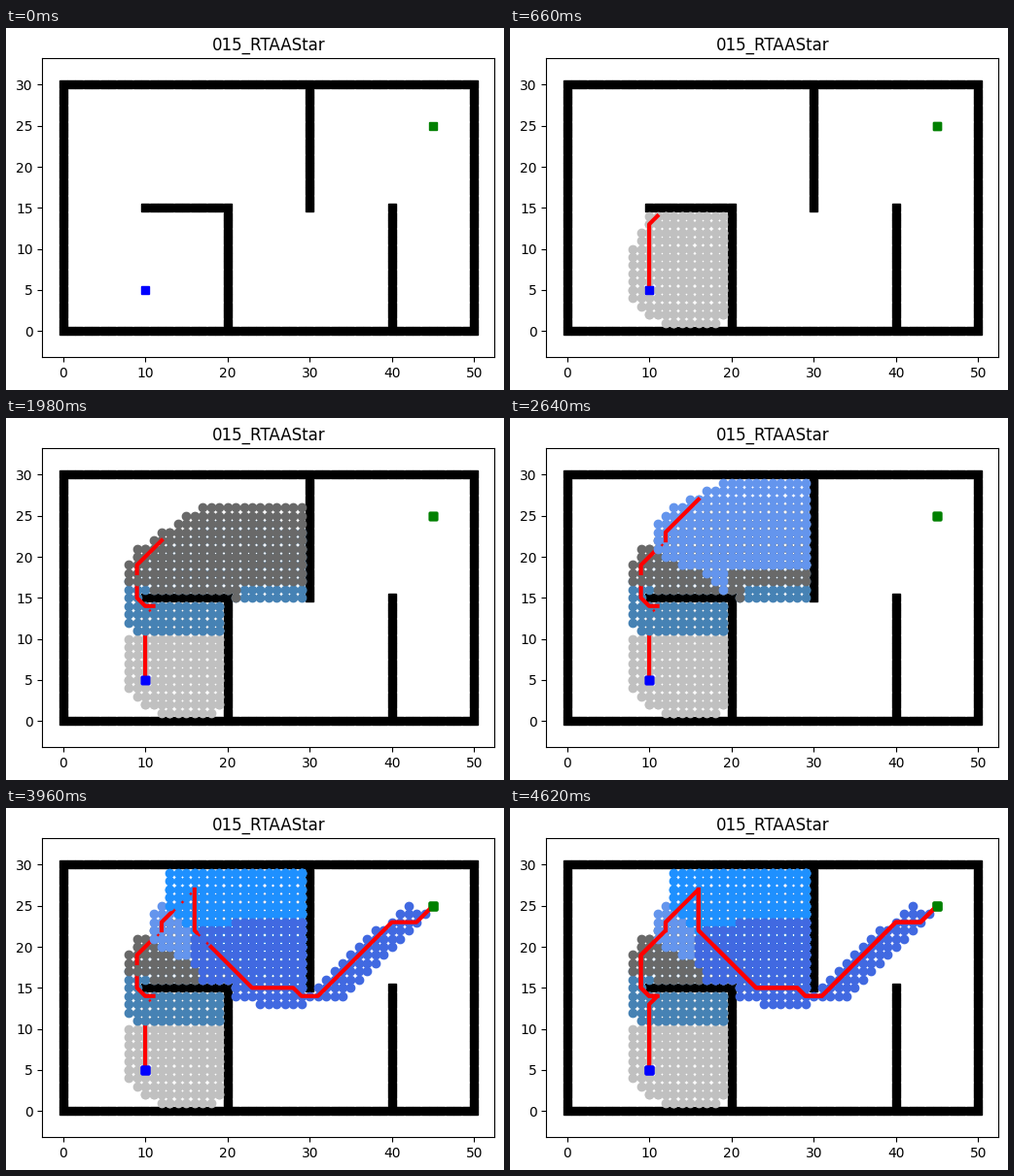
Recreate the animation shown at these times as a matplotlib script. Size 512 by 373 pixels, loop 5280 ms.

```python
import math

import matplotlib.pyplot as plt
from matplotlib.animation import ArtistAnimation

W, H, DPI = 512, 373, 100
AXES = (37.42, 33.7, 465, 308)  # left, bottom, width, height in pixels
START, GOAL = (10, 5), (45, 25)
EXPANSIONS = 240
MOVES = [(-1, 0), (-1, 1), (0, 1), (1, 1), (1, 0), (1, -1), (0, -1), (-1, -1)]
COLORS = ["silver", "steelblue", "dimgray", "cornflowerblue", "dodgerblue",
          "royalblue"]


def build_walls():
    walls = {(x, y) for x in range(51) for y in (0, 30)}
    walls |= {(x, y) for x in (0, 50) for y in range(31)}
    walls |= {(x, 15) for x in range(10, 21)}
    walls |= {(20, y) for y in range(15)}
    walls |= {(30, y) for y in range(15, 30)}
    walls |= {(40, y) for y in range(16)}
    return walls


WALLS = build_walls()


def sift_up(heap, i):
    item = heap[i]
    while i and item < heap[(i - 1) // 2]:
        heap[i] = heap[(i - 1) // 2]
        i = (i - 1) // 2
    heap[i] = item


def push(heap, item):
    heap.append(item)
    sift_up(heap, len(heap) - 1)


def pop(heap):
    last = heap.pop()
    if not heap:
        return last
    top, i = heap[0], 0
    # Sink the hole to a leaf, then lift the last item from there.
    while 2 * i + 1 < len(heap):
        child = 2 * i + 1
        if child + 1 < len(heap) and not heap[child] < heap[child + 1]:
            child += 1
        heap[i] = heap[child]
        i = child
    heap[i] = last
    sift_up(heap, i)
    return top


def neighbors(p):
    steps = ((p[0] + dx, p[1] + dy) for dx, dy in MOVES)
    return [q for q in steps if q not in WALLS]


def cost(p, q):
    # Diagonal moves may not cut a wall corner.
    if (p[0], q[1]) in WALLS or (q[0], p[1]) in WALLS:
        return math.inf
    return math.hypot(q[0] - p[0], q[1] - p[1])


def astar(start, h):
    """Expand a limited number of nodes; stale heap entries count too."""
    heap = [(h[start], start)]
    closed, g, parent = [], {start: 0, GOAL: math.inf}, {start: start}
    while heap and len(closed) < EXPANSIONS:
        s = pop(heap)[1]
        closed.append(s)
        if s == GOAL:
            break
        for n in neighbors(s):
            if n in closed:
                continue
            new = g[s] + cost(s, n)
            if new < g.get(n, math.inf):
                g[n], parent[n] = new, s
                push(heap, (new + h[n], n))
    return [n for _, n in heap], closed, g, parent


def trace(end, start, step):
    path = [end]
    while path[-1] != start:
        path.append(step(path[-1]))
    return path[::-1]


def search():
    """Return (visited, path) for every round of the search."""
    h = {(x, y): math.hypot(GOAL[0] - x, GOAL[1] - y)
         for x in range(51) for y in range(31)}
    rounds, start = [], START
    while True:
        frontier, closed, g, parent = astar(start, h)
        if closed[-1] == GOAL:
            rounds.append((closed, trace(GOAL, start, parent.get)))
            return rounds
        score = {n: g[parent[n]] + 1 + h[n] for n in frontier}
        target = min(score, key=score.get)
        learned = {n: score[target] - g[n] for n in closed}
        h.update(learned)

        def step(s):
            known = [n for n in neighbors(s) if n in learned]
            return max(known, key=learned.get)

        rounds.append((closed, trace(target, start, step)))
        start = target


fig = plt.figure(figsize=(W / DPI, H / DPI), dpi=DPI)
left, bottom, width, height = AXES
ax = fig.add_axes([left / W, bottom / H, width / W, height / H])
half = 27.5 * height / width
ax.set_xlim(-2.5, 52.5)
ax.set_ylim(15 - half, 15 + half)
ax.set_title("015_RTAAStar")


def draw(points, *style, **kwargs):
    return ax.plot(*zip(*points), *style, **kwargs)


def draw_path(path):
    return (draw(path, lw=3, color="r") + draw([START], "bs")
            + draw([GOAL], "gs"))


draw(sorted(WALLS), "sk")
draw([START], "bs")
draw([GOAL], "gs")

shown = []
frames = [[]]
full_path = []
for (visited, path), color in zip(search(), COLORS):
    cells = [p for p in visited if p not in (START, GOAL)]
    shown = shown + draw(cells, "o", color=color) + draw_path(path)
    frames.append(shown)
    full_path += path
frames.append(shown + draw_path(full_path[1:]))

anim = ArtistAnimation(fig, frames, interval=660, repeat=True, repeat_delay=0)
plt.show()
```
